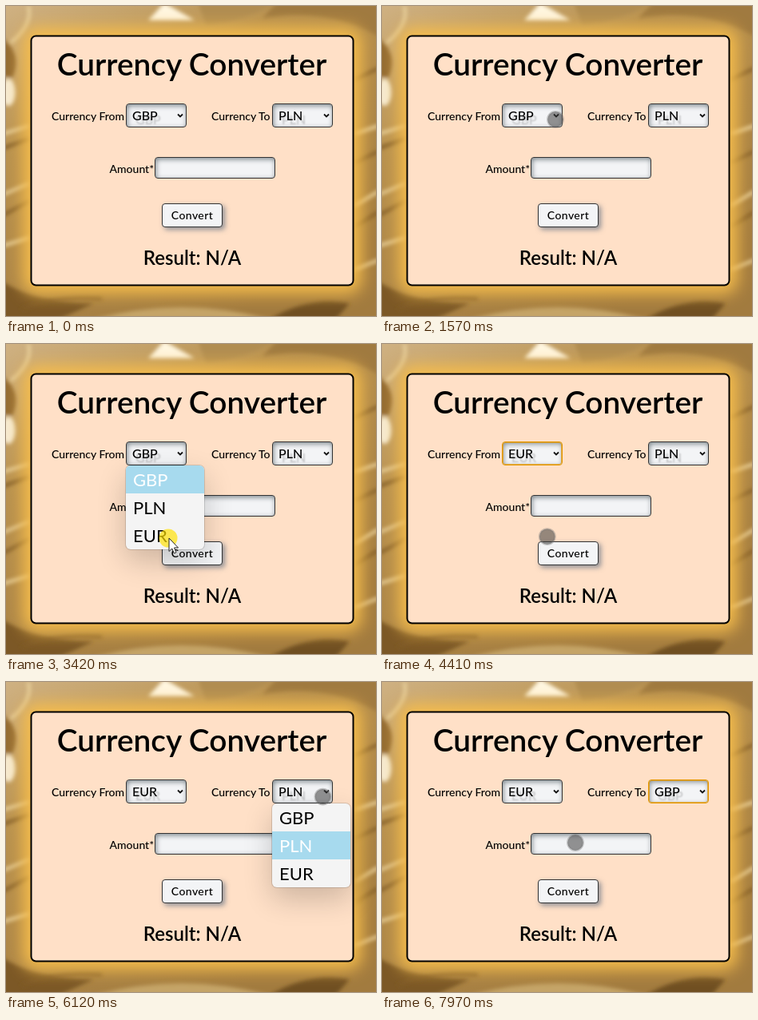
Recreate the animation shown at these times as an HTML page. Size 463 by 388 pixels, loop 8 s.

```html
<!DOCTYPE html>
<html lang="en">
<head>
<meta charset="utf-8">
<title>Currency Converter</title>
<style>
html, body { margin: 0; width: 100%; height: 100%; overflow: hidden; }
body { position: relative; font: 500 16px Lato, sans-serif; color: #000; background: #b08a4a; }
svg, .glow, .box, .menu { position: absolute; box-sizing: border-box; }
svg { left: 0; top: 0; }
.glow {
  left: 31px; top: 37px; width: 404px; height: 313px;
  border-radius: 7px; box-shadow: 0 0 20px 10px #f6bd4c;
}
.box {
  border: 1px solid #333; border-radius: 4px; background: #f3f4f6; overflow: hidden;
  box-shadow: inset 1px 2px 6px #7d878c;
}
.select {
  top: 122px; width: 76px; height: 30px; padding-left: 7px; line-height: 28px;
  text-shadow: 4px 5px 2px #0003;
}
.select.focus { border-color: #e59700; outline: 1px solid #e59700aa; outline-offset: -2px; }
.amount { left: 186px; top: 189px; width: 151px; height: 27px; }
.button {
  left: 195px; top: 247px; width: 76px; height: 30px; line-height: 28px;
  text-align: center; font-size: 14px; letter-spacing: .4px; box-shadow: 3px 3px 6px #3650708c;
}
.menu {
  top: 152px; width: 98px; height: 105px; border-radius: 6px; background: #f4f4f4;
  box-shadow: 0 0 0 1px #0002, 0 14px 36px #0003; font: 22px/35px Lato, sans-serif; overflow: hidden;
}
.menu div { padding-left: 9px; height: 35px; }
.menu .on { background: #a7daee; color: #fff; }
</style>
</head>
<body>
<svg width="463" height="388">
  <defs>
    <linearGradient id="gold" x2=".6" y2="1">
      <stop offset="0" stop-color="#cfb182"/>
      <stop offset=".35" stop-color="#b8914f"/>
      <stop offset="1" stop-color="#a27b3f"/>
    </linearGradient>
    <filter id="soft"><feGaussianBlur stdDeviation="2.500"/></filter>
  </defs>
  <rect width="463" height="388" fill="url(#gold)"/>
  <g filter="url(#soft)">
    <path d="M240 -5H340Q300 20 250 24Z" fill="#b18d51"/>
    <path d="M340 -5H470V40Q400 0 320 16Z" fill="#a07a40"/>
    <path d="M198 -4L178 18H236Z" fill="#fff6e0"/>
    <ellipse cx="3" cy="108" rx="9" ry="17" fill="#f6ead0"/>
    <path d="M-5 40Q22 60 8 90L-5 88Z" fill="#946c30"/>
    <path d="M-5 345Q40 372 110 372L60 395H-5Z" fill="#7b5825"/>
    <path d="M330 392Q380 362 430 372L410 395Z" fill="#6f4f20"/>
    <path d="M110 392Q220 362 330 392Z" fill="#c5a468"/>
  </g>
  <g filter="url(#soft)" fill="none" stroke-width="4">
    <path d="M28 0Q34 24 6 46M-4 160L30 150M-4 236L30 222M-4 300L30 290M436 160L466 150M436 250L466 232M436 330L466 318" stroke="#e8d09c"/>
    <path d="M-4 178L30 166M-4 262L30 244M20 380Q60 362 120 366M436 92L466 78M436 196L466 182M436 276L466 258" stroke="#805c28"/>
  </g>
</svg>
<div class="glow"></div>
<svg width="463" height="388">
  <rect x="31.500" y="37.500" width="403" height="312" rx="6" fill="#ffe0c7" stroke="#000" stroke-width="2"/>
  <g font-weight="600" text-anchor="middle">
    <text x="232.500" y="87" font-size="38.8">Currency Converter</text>
    <text x="233" y="323.500" font-size="24">Result: N/A</text>
  </g>
  <g font-size="14">
    <text x="57" y="143">Currency From</text>
    <text x="257" y="143">Currency To</text>
    <text x="129.500" y="209">Amount*</text>
  </g>
</svg>
<div class="box select" style="left:150px"></div>
<div class="box select" style="left:333px"></div>
<div class="box amount"></div>
<div class="box button">Convert</div>
<svg width="463" height="388" fill="none" stroke="#111" stroke-width="1.800">
  <path d="M215 135.500l3 3 3-3M398 135.500l3 3 3-3"/>
</svg>
<div class="menu" style="left:150px"><div>GBP</div><div>PLN</div><div>EUR</div></div>
<div class="menu" style="left:333px"><div>GBP</div><div>PLN</div><div>EUR</div></div>
<svg width="463" height="388">
  <circle id="touch" r="9.700" fill="#3c3c3c" fill-opacity=".54" stroke="#777" stroke-opacity=".4" stroke-width="2.500"/>
  <g id="arrow">
    <circle r="11.500" fill="#ffe000" fill-opacity=".68"/>
    <path d="M1 0v16.500l3.800-3.500 2.500 6 2.700-1.200-2.500-5.800h5z" fill="#fff" stroke="#222"/>
  </g>
</svg>
<script>
const STEP = 70, LOOP = 8000;
// start ms, steps, from x, y, to x, y
const moves = [
  [590, 12, 385, 366, 217, 146],
  [1430, 3, 217, 146, 217, 142],
  [2650, 1, 217, 142, 215, 140],
  [2720, 11, 215, 140, 203, 243],
  [4410, 12, 203, 243, 395, 147],
  [5250, 1, 395, 147, 397, 143],
  [6120, 11, 397, 143, 374, 168],
  [7480, 8, 374, 168, 242, 201]
];
const selects = document.querySelectorAll('.select');
const menus = document.querySelectorAll('.menu');
const touch = document.getElementById('touch');
const arrow = document.getElementById('arrow');

function pointer(t) {
  const move = moves.findLast(m => m[0] <= t);
  if (!move) return null;
  const [start, steps, x0, y0, x1, y1] = move;
  const p = Math.min(1, (Math.floor((t - start) / STEP) + 1) / steps);
  const e = p * p * (3 - 2 * p);
  return [x0 + (x1 - x0) * e, y0 + (y1 - y0) * e];
}

// Stepped fade in; 0 outside the open interval
function fade(t, open, close) {
  if (t < open || t >= close) return 0;
  return Math.min(1, (Math.floor((t - open) / STEP) + 1) / 4);
}

function setSelect(i, value, focus) {
  selects[i].textContent = value;
  selects[i].classList.toggle('focus', focus);
}

function setMenu(i, opacity, active) {
  menus[i].style.opacity = opacity;
  [...menus[i].children].forEach((row, k) => row.classList.toggle('on', k === active));
}

function show(el, on, at) {
  el.style.display = on ? '' : 'none';
  if (on) el.setAttribute('transform', `translate(${at})`);
}

function draw() {
  const t = performance.now() % LOOP;
  const at = pointer(t);
  const first = fade(t, 1770, 3750), second = fade(t, 5450, 6950);
  const inMenu = !!at && at[1] > 152 && first + second > 0;
  setSelect(0, t < 3750 ? 'GBP' : 'EUR', t >= 3750 && t < 5450);
  setSelect(1, t < 6950 ? 'PLN' : 'GBP', t >= 6950);
  setMenu(0, t >= 3620 ? first / 2 : first, t >= 3620 ? 2 : 0);
  setMenu(1, second, inMenu ? 0 : 1);
  show(touch, at && !inMenu, at);
  show(arrow, inMenu, at);
  requestAnimationFrame(draw);
}
draw();
</script>
</body>
</html>
```
